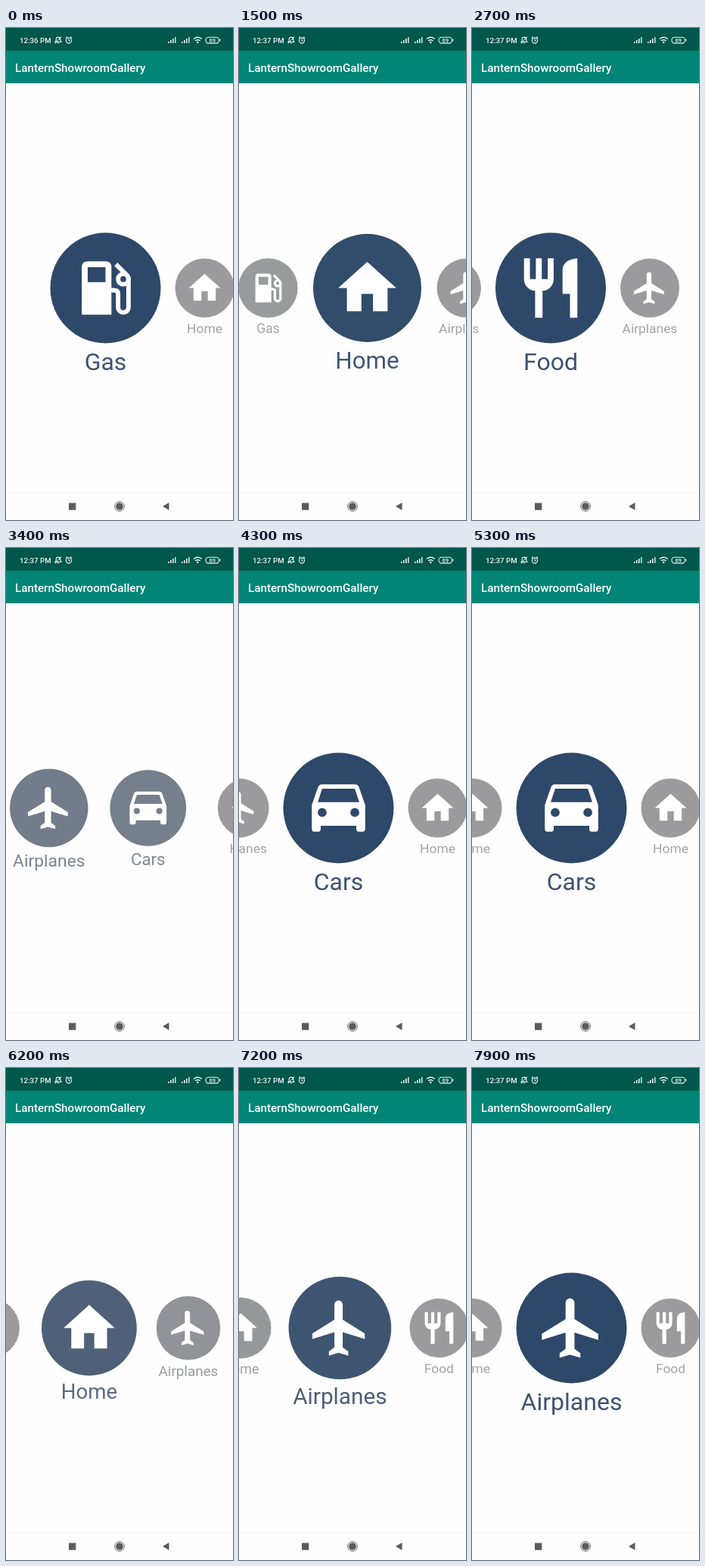
Write an HTML page that moves like this. It is 300 px wide and 650 px high and loops after 8000 ms.

```html
<!DOCTYPE html>
<html lang="en">
<head>
<meta charset="utf-8">
<title>Carousel</title>
<style>
  html, body { margin: 0; width: 100%; height: 100%; overflow: hidden; background: #fdfefd; }
  svg { display: block; width: 100vw; height: 100vh; }
  text { font-family: Roboto, "Noto Sans", sans-serif; }
</style>
</head>
<body>
<svg viewBox="0 0 300 650" xmlns="http://www.w3.org/2000/svg">
  <defs>
    <g id="Gas">
      <path fill-rule="evenodd" d="M4 21V5q0-2 2-2h6q2 0 2 2v16ZM6 5v5h6V5Z"/>
      <g fill="none" stroke="#fff" stroke-width="1.5">
        <path d="M13 12.75h2q1.25 0 1.25 1.25v4.5a1.75 1.75 0 0 0 3.5 0V9q0-.8-.6-1.35L15.5 4"/>
        <circle cx="18" cy="9" r="1.75"/>
      </g>
    </g>
    <path id="Home" d="M10 20v-6h4v6h5v-8h3L12 3 2 12h3v8z"/>
    <path id="Airplanes" d="M21 16v-2l-8-5V3.5a1.5 1.5 0 0 0-3 0V9l-8 5v2l8-2.5V19l-2 1.5V22l3.5-1 3.5 1v-1.5L13 19v-5.5z"/>
    <path id="Food" d="M11 9H9V2H7v7H5V2H3v7a4 4 0 0 0 3.75 3.97V22h2.5v-9.03A4 4 0 0 0 13 9V2h-2zM16 6v8h2.5v8H21V2q-5 .5-5 4z"/>
    <path id="Cars" fill-rule="evenodd" d="M5.1 5Q5.4 4 6.5 4h11Q18.6 4 18.9 5L21 11v8q0 1-1 1h-1q-1 0-1-1v-1H6v1q0 1-1 1H4q-1 0-1-1v-8ZM5 10h14l-1.5-4.5h-11ZM5 13.5a1.5 1.5 0 0 0 3 0a1.5 1.5 0 0 0-3 0M16 13.5a1.5 1.5 0 0 0 3 0a1.5 1.5 0 0 0-3 0"/>
    <g id="signal">
      <path d="M0 20v-2h1.6v2zM3 20v-4h1.6v4zM6 20v-6h1.6v6z"/>
      <path d="M9 20v-8h1.6v8z" opacity=".85"/>
    </g>
  </defs>

  <rect width="300" height="650" fill="#fdfefd"/>
  <g id="carousel" fill="#fff"></g>

  <rect width="300" height="30.5" fill="#00574b"/>
  <rect y="30" width="300" height="43" fill="#008577"/>
  <text x="12" y="58" font-size="15.2" font-weight="500" fill="#fff">LanternShowroomGallery</text>

  <g fill="#e9f2f0">
    <text id="clock" x="18" y="19.7" font-size="9.7" font-weight="500"></text>
    <use href="#signal" x="214"/>
    <use href="#signal" x="232"/>
    <circle cx="253.3" cy="19" r="1.2"/>
    <text x="272.7" y="18.9" font-size="7.5" font-weight="500" text-anchor="middle">69</text>
  </g>
  <g fill="none" stroke="#e9f2f0" stroke-width="1.1">
    <path d="M65 18.5h8l-1.2-1.6v-2a2.8 2.8 0 0 0-5.6 0v2zM68 20h2M64.8 20.5l8.2-9"/>
    <circle cx="83" cy="16.5" r="3.6"/>
    <path d="M83 14.2v2.5l1.7.9M78.8 13.3l2-1.8M87.2 13.3l-2-1.8"/>
    <path d="M248 14.5q5.3-4.4 10.6 0M250 17q3.3-2.6 6.6 0" stroke-width="1.4"/>
    <rect x="264" y="12.3" width="17.5" height="7.8" rx="3.6"/>
    <path d="M283 14.6v3"/>
  </g>

  <path d="M0 614.5h300" stroke="#f1f2f1"/>
  <g fill="#5c5c5c">
    <rect x="83" y="627.5" width="9.3" height="9.3"/>
    <circle cx="150" cy="632" r="4.8"/>
    <circle cx="150" cy="632" r="6.3" fill="none" stroke="#5c5c5c"/>
    <path d="M207 632l8.5-5v10z"/>
  </g>
</svg>
<script>
const LOOP = 8000, STEP = 100;
const CENTER_X = 131.5, CENTER_Y = 343.5, SPACING = 131;
const items = "Gas Home Airplanes Food Airplanes Cars Home Cars Home Airplanes Food".split(" ");

// Each pair is [ms, item index]; focus settles a little ahead of the scroll.
const scrollKeys = [[1200, 0], [1500, .71], [2000, 1], [2100, 1], [2700, 3.21], [3000, 3],
  [3600, 5.12], [3900, 5], [4400, 5], [5000, 7.12], [5300, 7],
  [5800, 7], [6300, 8.3], [6700, 8], [6800, 8], [7300, 9.1], [7700, 9]];
const focusKeys = [[1200, 0], [1500, .97], [1600, 1], [2100, 1], [2600, 3],
  [3000, 3], [3600, 5], [4400, 5], [5000, 7],
  [5800, 7], [6300, 8.35], [6600, 8], [6800, 8], [7300, 9]];

const mix = (a, b, k) => a + (b - a) * k;
const rgb = (a, b, k) => `rgb(${a.map((v, i) => Math.round(mix(v, b[i], k)))})`;
const smooth = k => k * k * (3 - 2 * k);

function valueAt(keys, t) {
  const next = keys.findIndex(key => key[0] > t);
  if (next === 0) return keys[0][1];
  if (next < 0) return keys[keys.length - 1][1];
  const [t0, v0] = keys[next - 1], [t1, v1] = keys[next];
  return mix(v0, v1, smooth((t - t0) / (t1 - t0)));
}

function add(parent, tag, attrs) {
  const el = document.createElementNS("http://www.w3.org/2000/svg", tag);
  set(el, attrs);
  return parent.appendChild(el);
}
function set(el, attrs) {
  for (const name in attrs) el.setAttribute(name, attrs[name]);
}

const carousel = document.getElementById("carousel");
const clock = document.getElementById("clock");
const cards = items.map(name => {
  const group = add(carousel, "g", {});
  const disc = add(group, "circle", { cy: CENTER_Y });
  const icon = add(group, "use", { href: "#" + name });
  const label = add(group, "text", { "text-anchor": "middle" });
  label.textContent = name;
  return { group, disc, icon, label };
});

function render(t) {
  const scroll = valueAt(scrollKeys, t), focus = valueAt(focusKeys, t);
  clock.textContent = t < 600 ? "12:36 PM" : "12:37 PM";
  cards.forEach(({ group, disc, icon, label }, i) => {
    const x = CENTER_X + (i - scroll) * SPACING;
    const grow = Math.max(0, 1 - Math.abs(i - focus)) ** 1.5;
    const radius = mix(39, 73, grow);
    set(group, { visibility: Math.abs(x - 150) < 260 ? "visible" : "hidden" });
    set(disc, { cx: x, r: radius, fill: rgb([155, 155, 157], [45, 72, 105], grow) });
    set(icon, { transform: `translate(${x} ${CENTER_Y}) scale(${radius * .0537}) translate(-12 -12)` });
    set(label, {
      x, y: mix(402.5, 452, grow), "font-size": mix(17.4, 32, grow),
      fill: rgb([163, 163, 163], [62, 82, 114], grow)
    });
  });
}

const start = performance.now();
function tick() {
  const t = (performance.now() - start) % LOOP;
  render(Math.floor(t / STEP) * STEP);
  requestAnimationFrame(tick);
}
tick();
</script>
</body>
</html>
```
